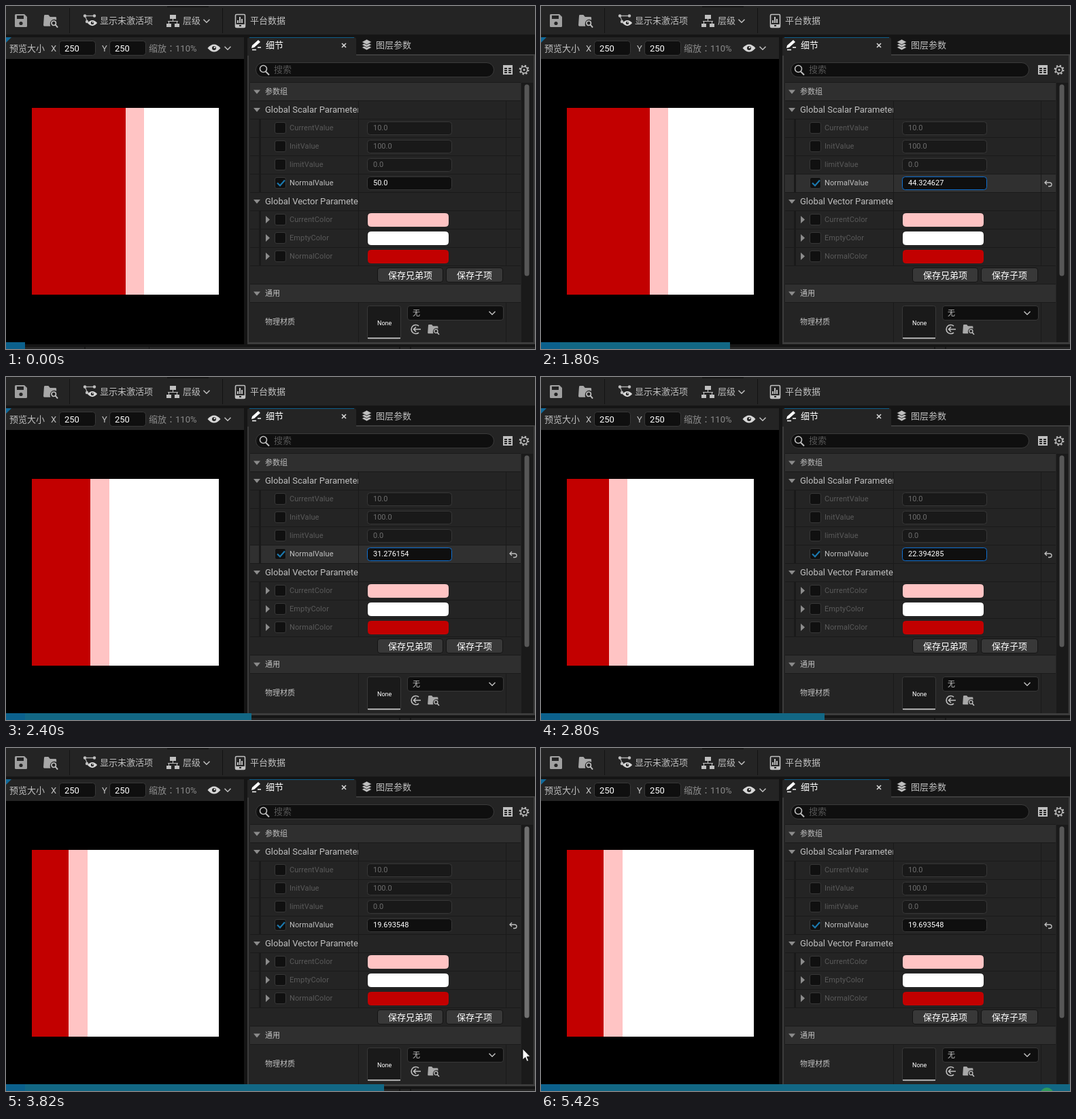
Animation, 778 px wide and 505 px high, one loop 5.62 s. Source, as an HTML page:

```html
<!DOCTYPE html>
<html lang="zh-CN">
<head>
<meta charset="utf-8">
<style>
  html, body { margin: 0; width: 100%; height: 100%; overflow: hidden; background: #151515; }
  svg { display: block; width: 778px; height: 505px; }
  text { font-family: Roboto, "Noto Sans CJK SC", "Noto Sans CJK", sans-serif; white-space: pre; }
  .mid { font-family: "Noto Sans CJK JP", "Noto Sans CJK", sans-serif; }
</style>
</head>
<body>
<svg id="stage" viewBox="0 0 778 505" xmlns="http://www.w3.org/2000/svg"></svg>
<script>
const stage = document.getElementById('stage');
const BG = '#242424', DARK = '#151515', LINE = '#1a1a1a', TEXT = '#c0c0c0', DIM = '#5a5a5a';
const RED = '#c20000', PINK = '#ffc4c4';

const rect = (x, y, w, h, fill, extra = '') =>
  `<rect x="${x}" y="${y}" width="${w}" height="${h}" fill="${fill}" shape-rendering="crispEdges" ${extra}/>`;
const box = (x, y, w, h, r, fill, stroke = fill, extra = '') =>
  `<rect x="${x + .5}" y="${y + .5}" width="${w - 1}" height="${h - 1}" rx="${r}" fill="${fill}" stroke="${stroke}" ${extra}/>`;
const text = (x, y, str, size = 13, fill = TEXT, extra = '') =>
  `<text x="${x}" y="${y}" font-size="${size}" fill="${fill}" ${extra}>${str}</text>`;
const path = (d, fill, extra = '') => `<path d="${d}" fill="${fill}" ${extra}/>`;
const line = (d, stroke = TEXT, w = 1.5, extra = '') =>
  `<path d="${d}" fill="none" stroke="${stroke}" stroke-width="${w}" ${extra}/>`;
const circle = (x, y, r, fill, extra = '') => `<circle cx="${x}" cy="${y}" r="${r}" fill="${fill}" ${extra}/>`;
const at = (x, y, body, scale = 1) => `<g transform="translate(${x} ${y}) scale(${scale})">${body}</g>`;

const chevron = (x, y) => line(`M${x - 4.5} ${y - 2.2}l4.5 4.5 4.5-4.5`);
const openMark = (x, y) => path(`M${x - 5} ${y - 2.5}h10l-5 6z`, '#8c8c8c');
const closedMark = (x, y) => path(`M${x - 2.5} ${y - 5.5}v11l6-5.5z`, '#8c8c8c');
const folderSearch = (x, y, scale) => at(x, y,
  path('M0 1.5q0-1.5 1.5-1.5h5l2.5 3h8q1.5 0 1.5 1.5v3.500q-3-2-6-.5-5 3-3 9.500h-9q-1.500 0-1.500-1.500z', '#a8a8a8') +
  circle(14.5, 12.5, 3.3, 'none', 'stroke="#c0c0c0" stroke-width="1.7"') +
  line('M17 15l3.500 4', TEXT, 2), scale);
const eye = (x, y, scale) => at(x, y,
  path('M-9.500 0Q0-11 9.500 0Q0 11-9.500 0z', '#d8d8d8') + circle(0, 0, 3, BG) + circle(.8, -1, 1.2, '#d8d8d8'), scale);

function toolbar() {
  const save = path('M13 13.500q0-1.500 1.500-1.500h12.500l4 4v13.500q0 1.500-1.500 1.500h-15q-1.500 0-1.500-1.500z', '#a0a0a0') +
    rect(16, 14, 10, 5, BG) + circle(22, 25.5, 2.6, BG);
  const nodes = line('M116 14.500l4 9M116 14.500h14', '#a8a8a8', 1.3) +
    [[116, 14.5], [130, 14.5], [119, 23]].map(p => circle(...p, 2.2, TEXT)).join('') + eye(127, 25, .75);
  const tree = rect(241, 13, 9, 6, TEXT) + rect(245, 19, 1, 4, TEXT) + rect(238, 22, 15, 1, TEXT) +
    [236, 248].map(x => rect(x, 26, 7, 5, TEXT) + rect(x + 3, 22, 1, 4, TEXT)).join('');
  const device = box(337, 12, 15, 20, 1.5, 'none', TEXT, 'stroke-width="1.6"') + rect(338, 27, 13, 4, TEXT) +
    rect(340, 21, 2, 4, TEXT) + rect(343, 16, 2, 9, TEXT) + rect(346, 19, 2, 6, TEXT) + rect(343, 28, 3, 2, BG);
  return rect(0, 0, 778, 42, BG) + rect(237, 0, 61, 2, DARK) +
    rect(93, 3, 1, 37, '#131313') + rect(318, 3, 1, 37, '#131313') +
    save + folderSearch(56, 13, .98) + nodes + tree + device + chevron(295, 22) +
    text(138, 26, '显示未激活项') + text(260, 26, '层级') + text(359, 26, '平台数据');
}

function preview() {
  const num = x => box(x, 51, 54, 22, 4, '#0f0f0f', '#383838') + text(x + 8, 66.5, '250', 13, '#fff');
  return rect(0, 46, 350, 32, BG) + path('M0 46h8l-8 8z', '#0f6a9c') +
    text(5, 66.5, '预览大小') + text(66, 66.5, 'X') + num(78) + text(141, 66.5, 'Y') + num(152) +
    text(210, 66.5, '缩放<tspan class="mid" lang="ja">：</tspan>110%', 13, '#8c8c8c') +
    eye(306, 62, 1) + chevron(326, 62) +
    rect(0, 78, 350, 420, '#000') + rect(38, 150, 275, 275, '#fff') +
    rect(38, 150, 0, 275, RED, 'id="red"') + rect(38, 150, 27, 275, PINK, 'id="pink"');
}

function tabs() {
  const pen = path('M361 62l1-4 9-8 3 3-9 8z', '#fff') + line('M362 64.500h6M370 61h5', '#fff', 1.5);
  const layers = [8, 4, 0].map(d =>
    path(`M523 ${53 + d}l7.500-4 7.500 4-7.500 4z`, TEXT, `stroke="${DARK}" stroke-width=".8"`)).join('');
  const gear = circle(762, 94, 4.8, 'none', 'stroke="#c0c0c0" stroke-width="1.5"') +
    circle(762, 94, 6.4, 'none', 'stroke="#c0c0c0" stroke-width="2" stroke-dasharray="2.300 2.727"') +
    circle(762, 94, 1.6, TEXT);
  const cells = [91, 94, 97].map(y => rect(733, y, 4, 2, BG) + rect(739, y, 4, 2, BG)).join('');
  return rect(355, 71, 423, 427, '#3c3c3c') + rect(357, 73, 419, 422, BG) +
    path('M355 73v-24q0-3 3-3h154q3 0 3 3v24z', BG) + rect(358, 46, 154, 1, '#0f5f8c') +
    pen + text(382, 62, '细节', 13, '#fff') + line('M494 55l6 6M500 55l-6 6', '#d8d8d8', 1.6) +
    layers + text(544, 62, '图层参数') +
    box(367, 83, 351, 22, 10.5, '#0f0f0f', '#3a3a3a') +
    circle(378.5, 92.5, 5, 'none', 'stroke="#c0c0c0" stroke-width="1.600"') + line('M382 96.500l5 5', TEXT, 2) +
    text(394, 97.5, '搜索', 13, '#555') + rect(731, 87, 14, 14, TEXT) + cells + gear;
}

const rule = y => rect(359, y, 398, 1, LINE);

const section = (y, label) => rect(359, y, 398, 26, '#2f2f2f') + openMark(369, y + 13) +
  text(381, y + 17, label, 11);

const group = (y, label) => rule(y) + openMark(369, y + 13.5) +
  `<svg x="381" y="${y}" width="137" height="27">${text(0, 18, label)}</svg>`;

function row(y, label, on) {
  const tick = on ? line(`M399 ${y + 13.5}l4 4 7-8`, '#1b78ad', 2.2) : '';
  return rule(y) + rect(372, y, 3, 27, LINE) +
    box(395, y + 5, 17, 17, 2.5, '#101010', '#373737') + tick +
    text(417, y + 17.3, label, 11, on ? TEXT : DIM, 'letter-spacing=".1"');
}

const scalar = (y, label, value) => row(y, label) +
  box(531, y + 4, 125, 20, 4, '#191919', '#373737') + text(540, y + 17.3, value, 11, '#6e6e6e');

const vector = (y, label, color) => row(y, label) + closedMark(384.5, y + 13.5) +
  box(532, y + 4, 119, 20, 4, color);

const button = (x, w, label) => box(x, 385, w, 22, 3.5, '#383838', '#141414') +
  text(x + 16, 400.5, label, 13, '#fff', 'font-weight="500"');

function details() {
  const undo = line('M744 257l-3 3 3 3M741.500 260h6.500q3 0 3 2.800t-3 2.700h-2', TEXT, 1.4);
  const back = line('M607 471.200a6.500 6.500 0 1 0 0 9.600M610 476h-10M603 472.500l-3.500 3.500 3.500 3.500', TEXT, 1.6);
  return rule(112) + section(113, '参数组') +
    rect(359, 248, 398, 26, '#303030', 'id="hover"') +
    group(139, 'Global Scalar Parameters') +
    scalar(166, 'CurrentValue', '10.0') + scalar(193, 'InitValue', '100.0') + scalar(220, 'limitValue', '0.0') +
    row(247, 'NormalValue', true) +
    box(531, 251, 125, 20, 4, '#0f0f0f', '#383838', 'id="field"') +
    text(540, 264.3, '50.0', 11, '#fff', 'id="value"') + `<g id="undo">${undo}</g>` +
    group(274, 'Global Vector Parameters') +
    vector(301, 'CurrentColor', PINK) + vector(328, 'EmptyColor', '#fff') + vector(355, 'NormalColor', RED) +
    rule(382) + rect(518, 139, 1, 244, LINE) + rect(735, 139, 1, 244, LINE) +
    button(546, 97, '保存兄弟项') + button(647, 84, '保存子项') +
    rule(409) + section(410, '通用') + rule(436) +
    rect(518, 436, 1, 59, LINE) + rect(735, 436, 1, 59, LINE) +
    text(381, 469, '物理材质', 11) +
    box(531, 441, 50, 50, 3, '#1a1a1a', '#383838') + rect(532, 488, 48, 2, '#a8a8a8') +
    text(546, 470, 'None', 9, '#fff') +
    box(590, 441, 142, 22, 3.5, '#0f0f0f', '#383838') + text(598, 456, '无', 11) + chevron(715, 452) +
    back + folderSearch(621, 469, .78) +
    rect(758, 113, 17, 382, LINE) + box(762, 115, 8, 283, 3.5, '#575757', 'none', 'id="thumb"');
}

function bottom() {
  const cells = [[0, 115], [117, 93], [211, 367], [580, 14], [596, 182]];
  return rect(0, 498, 778, 7, DARK) + cells.map(([x, w]) => rect(x, 502, w, 3, BG)).join('') +
    `<svg id="bar" width="0" height="505">${rect(0, 495, 778, 10, '#126784') + rect(0, 495, 28, 10, '#0b608c') +
      circle(744, 510, 10, '#2f9a5c')}</svg>`;
}

const cursors =
  `<g id="arrow">${path('M0 0v16l3.700-3.500 2.500 5.800 2.300-1-2.500-5.700 4.800-.3z', '#fff', 'stroke="#111" stroke-width=".8"')}</g>` +
  `<g id="resize">${path('M-9.500 0l4.500-4.500v3h10v-3l4.500 4.500-4.500 4.500v-3h-10v3z', '#111', 'stroke="#fff" stroke-width="1.300"')}</g>`;

stage.innerHTML = rect(0, 0, 778, 505, DARK) + toolbar() + preview() + tabs() + details() + bottom() + cursors;
const el = Object.fromEntries([...stage.querySelectorAll('[id]')].map(e => [e.id, e]));

const LOOP = 5620, STEPS = 28, HOVER = 4, DRAG = 7, UNHOVER = 14, RELEASE = 17;
// dragged values, one per step from DRAG on; the last one stays
const values = [49.384521, 47.163845, 44.324627, 40.217583, 35.682907, 31.276154, 26.748316, 22.394285, 20.416732, 19.693548];
// step: [cursor, x, y]
const pointer = {
  2: ['arrow', 698, 372], 3: ['arrow', 640, 304], 4: ['resize', 590, 263], 5: ['resize', 582, 263],
  6: ['resize', 582, 263], 17: ['resize', 582, 263], 18: ['arrow', 611, 290], 19: ['arrow', 760, 443]
};

const show = (e, on) => e.setAttribute('visibility', on ? 'visible' : 'hidden');

function draw(step) {
  const dragged = step >= DRAG;
  const value = dragged ? values[Math.min(step - DRAG, values.length - 1)] : 50;
  const edge = Math.round(38 + value * 2.75), end = Math.round(65.5 + value * 2.75);
  el.red.setAttribute('width', edge - 38);
  el.pink.setAttribute('x', edge);
  el.pink.setAttribute('width', end - edge);
  el.value.textContent = dragged ? value.toFixed(6) : '50.0';

  const [kind, x, y] = pointer[step] || [];
  const active = dragged && step < RELEASE;
  show(el.hover, step >= HOVER && step < UNHOVER);
  show(el.undo, dragged);
  el.field.setAttribute('stroke', active ? '#0f6fd0' : kind === 'resize' ? '#6a6a6a' : '#383838');
  el.thumb.setAttribute('fill', step === 19 ? '#707070' : '#575757');
  el.bar.setAttribute('width', Math.round((step + 1) * 778 / STEPS));

  for (const name of ['arrow', 'resize']) {
    show(el[name], kind === name);
    if (kind === name) el[name].setAttribute('transform', `translate(${x} ${y})`);
  }
}

const start = performance.now();
function tick() {
  const t = (performance.now() - start) % LOOP;
  // one step in the middle holds 20 ms longer
  const step = t < 3400 ? Math.floor(t / 200) : Math.max(17, Math.floor((t - 20) / 200));
  draw(Math.min(step, STEPS - 1));
  requestAnimationFrame(tick);
}
tick();
</script>
</body>
</html>
```
